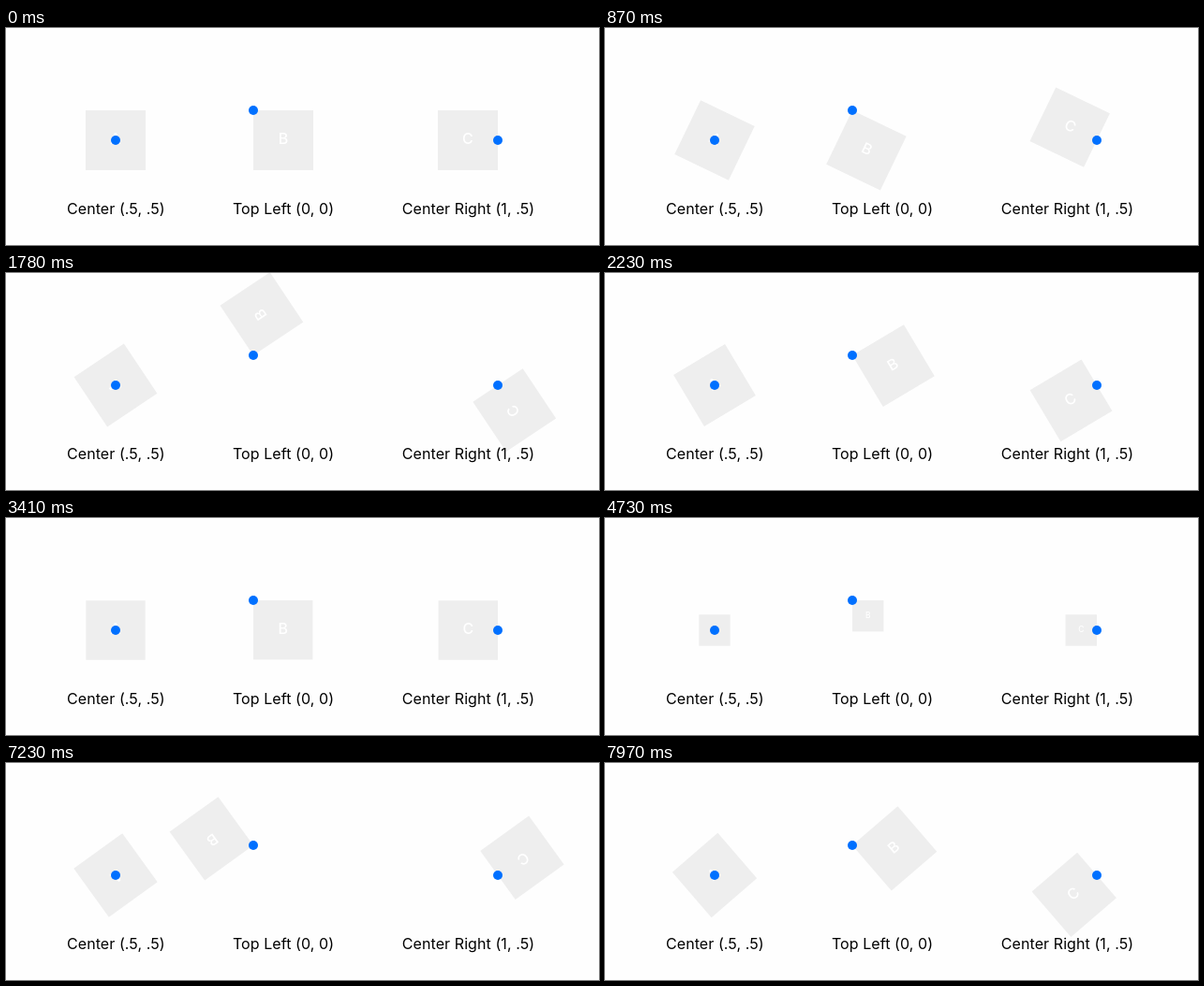
These frames come from a looping animation (633x232 px, 8000 ms). An HTML page with a canvas:

```html
<!DOCTYPE html>
<html lang="en">
<head>
<meta charset="utf-8">
<title>Transform origins</title>
<style>
html, body { margin: 0; width: 100%; height: 100%; overflow: hidden; background: #fefefe; }
canvas { display: block; }
</style>
</head>
<body>
<canvas id="stage" width="633" height="232"></canvas>
<script>
const ctx = document.getElementById('stage').getContext('2d');
const LOOP = 8000;
const SIZE = 64;

// Pivot position, pivot as a fraction of the box, and captions.
const boxes = [
  { x: 117, y: 120, ox: 0.5, oy: 0.5, letter: 'A', label: 'Center (.5, .5)', labelX: 117.3 },
  { x: 264, y: 88, ox: 0, oy: 0, letter: 'B', label: 'Top Left (0, 0)', labelX: 296 },
  { x: 525, y: 120, ox: 1, oy: 0.5, letter: 'C', label: 'Center Right (1, .5)', labelX: 493.5 }
];

function bezier(x1, y1, x2, y2) {
  const curve = (a, b, s) => 3 * a * s * (1 - s) ** 2 + 3 * b * s * s * (1 - s) + s ** 3;
  return x => {
    if (x <= 0) return 0;
    if (x >= 1) return 1;
    let low = 0, high = 1;
    for (let i = 0; i < 24; i++) {
      const mid = (low + high) / 2;
      if (curve(x1, x2, mid) < x) low = mid; else high = mid;
    }
    return curve(y1, y2, low);
  };
}

const easeInOut = bezier(0.42, 0, 0.58, 1);
const ease = bezier(0.25, 0.1, 0.25, 1);

// Holds the time between steps, as a low frame rate does.
const hold = (t, first, step) => first + Math.floor((t - first) / step) * step;

const turn = (t, start, duration) => 2 * Math.PI * easeInOut((t - start) / duration);

function pose(t) {
  if (t >= 6310) return { angle: turn(hold(t, 6310, 57.2), 6211, 2296), scale: 1 };
  if (t >= 3410) {
    const now = hold(t, 3410, 57);
    const scale = now < 4310
      ? 1 - easeInOut((now - 3345) / 955)
      : ease((now - 4310) / 1350);
    return { angle: 0, scale };
  }
  if (t >= 540) return { angle: turn(hold(t, 531, 56.3), 452, 2223), scale: 1 };
  return { angle: 0, scale: 1 };
}

function drawText(text, x, y, color, weight) {
  ctx.font = `${weight} 16px Inter, sans-serif`;
  ctx.fillStyle = color;
  ctx.fillText(text, x, y);
}

function drawBox(box, { angle, scale }) {
  ctx.save();
  ctx.translate(box.x, box.y);
  ctx.rotate(angle);
  ctx.scale(scale, scale);
  ctx.translate(-box.ox * SIZE, -box.oy * SIZE);
  ctx.fillStyle = '#eee';
  ctx.fillRect(0, 0, SIZE, SIZE);
  drawText(box.letter, SIZE / 2, 36, '#fff', 500);
  ctx.restore();
}

function drawDot({ x, y }) {
  ctx.fillStyle = '#0070ff';
  ctx.beginPath();
  ctx.arc(x, y, 5, 0, 2 * Math.PI);
  ctx.fill();
}

function draw(t) {
  ctx.fillStyle = '#fefefe';
  ctx.fillRect(0, 0, 633, 232);
  ctx.textAlign = 'center';
  ctx.letterSpacing = '0.08px';
  const now = pose(t);
  for (const box of boxes) {
    if (now.scale > 0) drawBox(box, now);
    drawDot(box);
    drawText(box.label, box.labelX, 199, '#000', 400);
  }
}

const began = performance.now();

function tick() {
  draw((performance.now() - began) % LOOP);
  requestAnimationFrame(tick);
}

tick();
</script>
</body>
</html>
```
